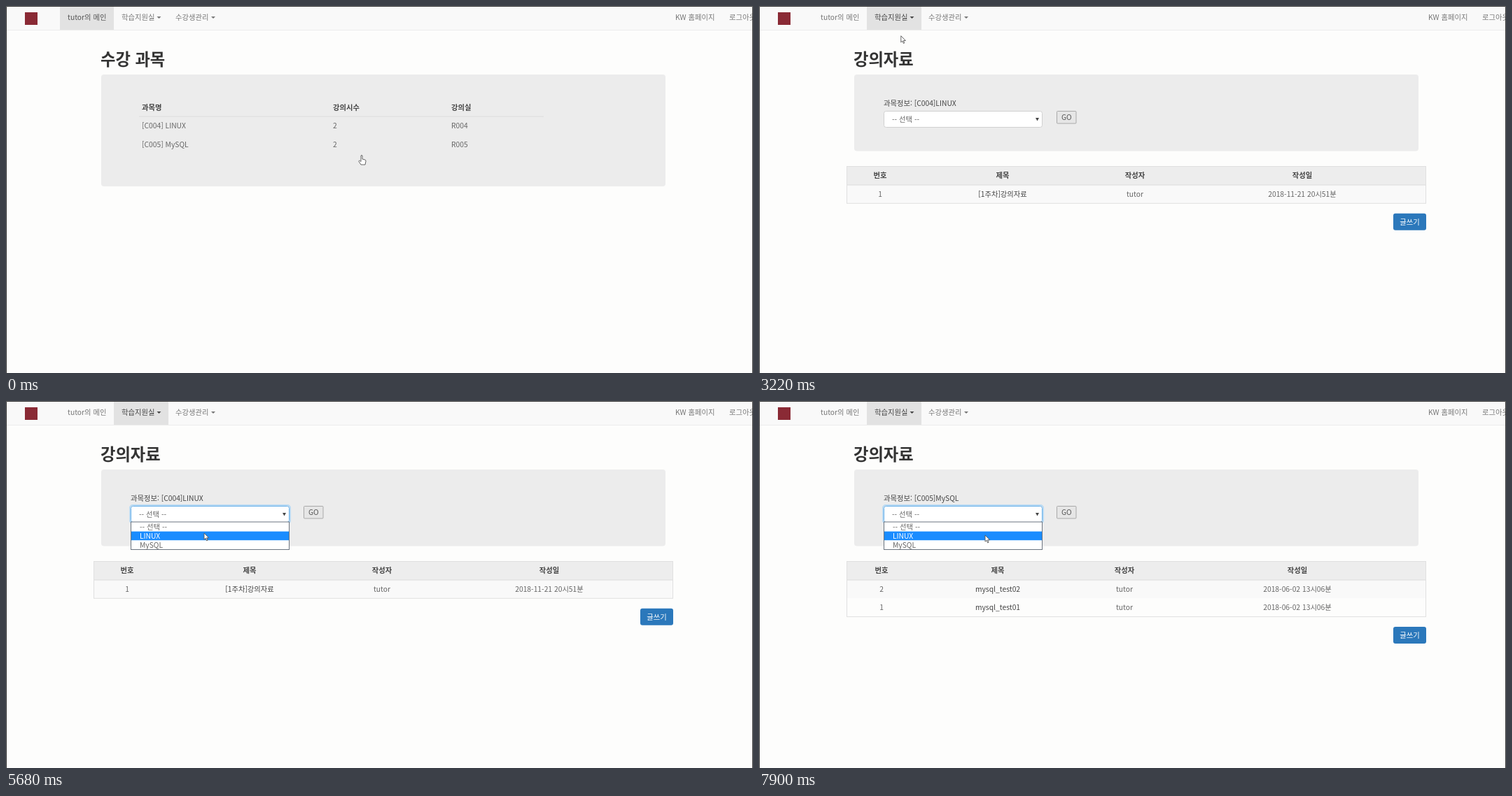
Animation of 1067x525 px, one loop 8 s. Source, as an HTML page:

```html
<!DOCTYPE html>
<html lang="ko">
<head>
<meta charset="utf-8">
<style>
  html, body { margin: 0; width: 100%; height: 100%; overflow: hidden; background: #fdfdfc; }
  svg { display: block; font: 10.3px "Noto Sans CJK KR", "Noto Sans", sans-serif; }
</style>
</head>
<body>
<svg id="stage" width="1067" height="525" viewBox="0 0 1067 525"></svg>
<script>
const LOOP = 8000, STEP = 60, OFFSET = 40;
const stage = document.getElementById('stage');

// Pointer path: time, x, y
const path = [
  [0, 508, 213], [520, 508, 213], [1060, 193, 16], [2260, 193, 16],
  [2320, 200, 27], [2500, 200, 27], [2680, 202, 41], [3160, 202, 41],
  [3400, 207, 52], [3580, 207, 52], [4000, 245, 152], [4840, 245, 152],
  [5200, 349, 159], [5500, 349, 159], [5680, 283, 189], [5920, 277, 202],
  [6460, 277, 202], [6640, 449, 160], [6700, 449, 160], [6820, 441, 160],
  [7000, 441, 160], [7300, 345, 160], [7600, 345, 160], [7900, 323, 192]
];

const rect = (x, y, w, h, fill, more = '') =>
  `<rect x="${x}" y="${y}" width="${w}" height="${h}" fill="${fill}" ${more}/>`;
const line = (x1, y1, x2, y2, color) =>
  `<path d="M${x1} ${y1}L${x2} ${y2}" stroke="${color}"/>`;
// Text is placed by the middle of its line
const text = (x, y, str, fill = '#666', more = '') =>
  `<text x="${x}" y="${y + 3.8}" fill="${fill}" ${more}>${str}</text>`;
const bold = 'font-weight="700"', middle = 'text-anchor="middle"';
const caret = (x, y, w, h, fill) => `<path d="M${x} ${y}h${w}l${-w / 2} ${h}z" fill="${fill}"/>`;
const title = str => text(135, 81, str, '#333', bold + ' font-size="23.3"');

function pointerAt(t) {
  const i = path.findIndex(p => p[0] > t);
  if (i < 0) return path[path.length - 1].slice(1);
  if (i === 0) return path[0].slice(1);
  const [t0, x0, y0] = path[i - 1], [t1, x1, y1] = path[i];
  const u = (t - t0) / (t1 - t0), k = u * u * (3 - 2 * u);
  return [x0 + (x1 - x0) * k, y0 + (y1 - y0) * k];
}

function pointer(x, y, hand) {
  const d = hand
    ? 'M-1 1Q0-.3 1 1V6L5 7Q6 7.4 6 9L5 14H-1L-4 9.5Q-4 7.5-2.5 8.3L-1 9.6Z'
    : 'M0 0V9.2L2.1 7.3 3.6 10.8 5 10.2 3.6 6.8H6.6Z';
  return `<path transform="translate(${x} ${y})" d="${d}" fill="#fff" stroke="#555" stroke-width=".9" stroke-linejoin="round"/>`;
}

function navbar(t) {
  const lecture = t >= 2920, open = t >= 1900 && t < 2680;
  const dark = lecture || (t >= 1000 && t < 2680);
  const color = dark ? '#444' : '#777';
  return rect(0, 0, 1067, 35, '#f9f9f9') + line(0, 34.5, 1067, 34.5, '#ececec') +
    rect(27, 9, 18, 18, '#8a2a35') +
    (lecture ? '' : rect(77, 1, 77, 33, '#e2e2e2')) +
    (lecture || open ? rect(154, 1, 78, 33, '#e2e2e2') : '') +
    text(88, 16, 'tutor의 메인', lecture ? '#777' : '#555') +
    text(165, 16, '학습지원실', color) + caret(215.5, 15, 6, 3, color) +
    text(242, 16, '수강생관리', '#777') + caret(293, 15, 6, 3, '#777') +
    text(956, 16, 'KW 홈페이지', '#777') + text(1033, 16, '로그아웃', '#777');
}

function menu(t) {
  return rect(154.5, 35.5, 114, 45, '#fff', 'rx="2" stroke="#ccc"') +
    (t >= 2560 ? rect(155, 39, 113, 19, '#f2f2f2') : '') +
    text(169, 48.5, '강의자료', '#444') + text(169, 67, '과제', '#444');
}

function statusBar(t) {
  const page = t < 2560 ? 'ucamMain.jsp#' : 'ucamBbs.jsp';
  return rect(-1, 516, 357, 12, '#f8f8f8', 'stroke="#ededed"') +
    text(-2, 523.2, 'localhost:8080/BBS/' + page, t < 2560 ? '#aaa' : '#888', 'font-size="8"');
}

function coursePage() {
  const row = (y, cells, ...style) =>
    cells.map((c, i) => text([194, 467, 636][i], y, c, ...style)).join('');
  return title('수강 과목') + rect(136, 98, 806, 160, '#ececec', 'rx="4"') +
    row(145, ['과목명', '강의시수', '강의실'], '#444', bold) +
    line(190, 158, 768, 158, '#dcdcdc') +
    row(171.5, ['[C004] LINUX', 2, 'R004']) + row(198, ['[C005] MySQL', 2, 'R005']);
}

function table(columns, rows) {
  const cells = (y, list, ...style) =>
    list.map((c, i) => text(columns[i], y, c, style[0] || (i === 1 ? '#444' : '#666'),
      middle + ' ' + (style[1] || ''))).join('');
  const bottom = 256 + rows.length * 26.3;
  return rect(125.5, 229.5, 827, 26.5, '#ededed') +
    cells(242.5, ['번호', '제목', '작성자', '작성일'], '#444', bold) +
    rows.map((r, i) => rect(125.5, 256 + i * 26.3, 827, 26.3, i ? '#fdfdfc' : '#f9f9f9') +
      cells(269 + i * 26.3, r)).join('') +
    line(125, 256, 953, 256, '#dcdcdc') +
    rect(125.5, 229.5, 827, bottom - 229.5, 'none', 'stroke="#e0e0e0"') +
    rect(906, bottom + 14.5, 47, 24, '#2b78bb', 'rx="3"') +
    text(929.5, bottom + 26.5, '글쓰기', '#fff', middle);
}

function picker(value, focus) {
  const glow = focus ? rect(177, 149, 229, 26, 'none', 'rx="4" stroke="#b9daf3" stroke-width="2"') : '';
  return glow + rect(178.5, 150.5, 226, 23, '#fff', `rx="3" stroke="${focus ? '#66afe9' : '#d0d0d0'}"`) +
    text(190, 162, value) + caret(395, 160, 5, 4.5, '#444');
}

function options(y) {
  const current = Math.max(0, Math.min(2, Math.floor((y - 174) / 12.7)));
  return rect(178.5, 173, 226, 39.5, '#fff', 'stroke="#6b7480"') +
    rect(179, 174 + current * 12.6, 225, 12.6, '#1a8cff') +
    ['-- 선택 --', 'LINUX', 'MySQL'].map((o, i) =>
      text(191, 180.3 + i * 12.7, o, i === current ? '#fff' : '#666')).join('');
}

function lecturePage(t, y) {
  const second = t >= 6940;
  const open = (t >= 5380 && t < 6160) || t >= 7600;
  const focus = (t >= 5500 && !second) || t >= 7600;
  const chosen = t >= 6160 && !second;
  return title('강의자료') + rect(136, 98, 806, 109.5, '#ececec', 'rx="4"') +
    text(178, 139, '과목정보: ' + (second ? '[C005]MySQL' : '[C004]LINUX'), '#444', 'font-weight="500"') +
    picker(chosen ? 'MySQL' : '-- 선택 --', focus) +
    rect(425.5, 150.5, 27.5, 17.5, '#e6e6e6', 'rx="1" stroke="#a9a9a9"') +
    text(439.3, 159, 'GO', '#555', middle) +
    (second
      ? table([175, 341, 522, 769], [
          [2, 'mysql_test02', 'tutor', '2018-06-02 13시06분'],
          [1, 'mysql_test01', 'tutor', '2018-06-02 13시06분']])
      : table([173, 348, 537, 776], [[1, '[1주차]강의자료', 'tutor', '2018-11-21 20시51분']])) +
    (open ? options(y) : '');
}

function draw(t) {
  const [x, y] = pointerAt(t);
  const hand = t < 100 || (t >= 1000 && t < 2680);
  stage.innerHTML = rect(0, 0, 1067, 525, '#fdfdfc') + navbar(t) +
    (t < 2920 ? coursePage() : lecturePage(t, y)) +
    (t >= 1900 && t < 2680 ? menu(t) : '') +
    (t >= 1060 && t < 3220 ? statusBar(t) : '') +
    pointer(x, y, hand) +
    '<path d="M.5 525V.5H1066.5V525" fill="none" stroke="#333"/>';
}

let last = null;
const start = performance.now();
function tick() {
  const t = (performance.now() - start) % LOOP;
  const step = Math.floor((t - OFFSET) / STEP) * STEP + OFFSET;
  if (step !== last) draw(last = step);
  requestAnimationFrame(tick);
}
tick();
</script>
</body>
</html>
```
